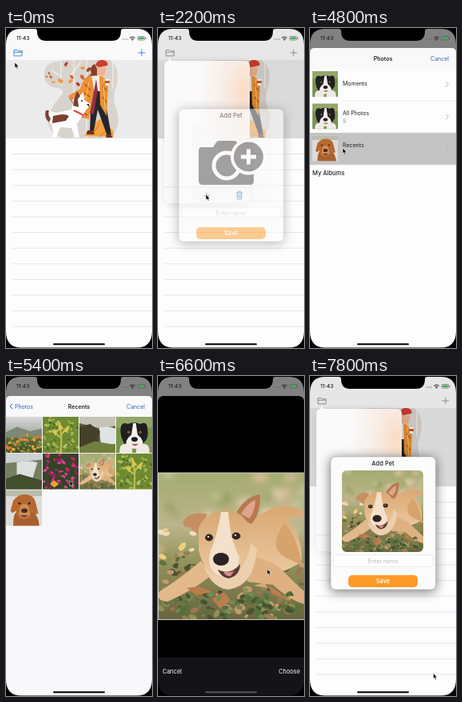
These frames come from a looping animation (183 by 400 pixels, 8 s). An HTML page:

```html
<!DOCTYPE html>
<html lang="en">
<head>
<meta charset="utf-8">
<title>Add a pet</title>
<style>
html, body { margin: 0; width: 100%; height: 100%; overflow: hidden; background: #000; }
svg { display: block; }
#stage { width: 100vw; height: 100vh; }
text { font: 7px Inter, sans-serif; fill: #222; }
.mid { text-anchor: middle; }
.bold { font-weight: 600; }
.link { fill: #2c62b8; }
.soft { fill: #999; }
.line { fill: none; stroke-linecap: round; stroke-linejoin: round; }
</style>
</head>
<body>
<svg id="stage" viewBox="0 0 183 400">
<defs>
  <linearGradient id="meadow" x2="0" y2="1">
    <stop offset="0" stop-color="#a3ab70"/><stop offset=".35" stop-color="#bdb58c"/>
    <stop offset=".6" stop-color="#94935c"/><stop offset="1" stop-color="#66643e"/>
  </linearGradient>
  <linearGradient id="fur" x2="0" y2="1">
    <stop offset="0" stop-color="#d9a873"/><stop offset="1" stop-color="#ecc9a0"/>
  </linearGradient>
  <linearGradient id="mist" x2="0" y2="1">
    <stop offset="0" stop-color="#d8d9da"/><stop offset=".45" stop-color="#a9b0a4"/>
    <stop offset=".6" stop-color="#596b39"/><stop offset="1" stop-color="#3d4f25"/>
  </linearGradient>
  <radialGradient id="glow" cx=".93" cy=".22" r=".55">
    <stop offset="0" stop-color="#fbdcc3"/><stop offset=".35" stop-color="#f8ebe2"/><stop offset="1" stop-color="#fbfafb"/>
  </radialGradient>
  <pattern id="checks" width="4" height="4" patternUnits="userSpaceOnUse">
    <path d="M0 0h2v2H0zM2 2h2v2H2z" fill="#f5f5f5"/>
  </pattern>
  <filter id="blur"><feGaussianBlur stdDeviation="4"/></filter>
  <filter id="haze" x="-30%" y="-30%" width="160%" height="160%"><feGaussianBlur stdDeviation="7"/></filter>
  <clipPath id="sheetClip"><path d="M0 400V31q0-6 6-6H177q6 0 6 6V400z"/></clipPath>
  <clipPath id="petClip"><rect x="40" y="118" width="102" height="102" rx="6"/></clipPath>
  <clipPath id="heroClip"><rect y="40" width="183" height="98"/></clipPath>

  <symbol id="puppy" viewBox="0 0 183 184">
    <rect width="183" height="184" fill="url(#meadow)"/>
    <g id="bokeh" filter="url(#blur)"></g>
    <g id="litter"></g>
    <path d="M104 75Q122 52 147 43Q170 38 183 50V56Q170 52 163 60Q182 80 180 112L160 122L122 130Z" fill="url(#fur)"/>
    <path d="M150 78Q142 96 160 106L181 116Q175 82 158 62Z" fill="#d6a36c"/>
    <path d="M54 110Q28 132 1 149Q-3 160 12 161Q42 148 66 129Z" fill="#e3b98c"/>
    <path d="M106 102Q143 108 156 122Q176 142 183 148V164Q165 159 144 140L112 136Z" fill="#dfb181"/>
    <path d="M56 108Q62 142 88 146Q120 142 124 96L108 78Z" fill="#ecd0ae"/>
    <path d="M62 52Q42 46 31 61Q32 69 40 68L49 76Z" fill="#c78e62"/>
    <path d="M97 52Q108 30 128 27Q129 51 117 64Z" fill="#b9784f"/>
    <path d="M104 51Q114 36 122 34Q122 49 114 57Z" fill="#dca58c"/>
    <path d="M51 68Q62 47 85 47Q111 48 115 74Q119 99 104 119Q92 132 76 130Q57 124 51 97Z" fill="url(#fur)"/>
    <path d="M79 49Q74 79 65 100Q60 123 80 130Q101 130 102 105Q91 86 88 49Z" fill="#f3e1cb"/>
    <path d="M75 121Q91 129 103 114Q103 128 89 132Q79 131 75 121Z" fill="#593b36"/>
    <path d="M82 123q9 3 14-1l-5 7q-7 1-9-6z" fill="#d98b86"/>
    <ellipse cx="79" cy="108" rx="10" ry="8" fill="#292326"/>
    <ellipse cx="64" cy="81" rx="5" ry="4.4" fill="#33271f"/><ellipse cx="98" cy="79" rx="5.5" ry="4.4" fill="#33271f"/>
    <path d="M62 80h2M96 78h2" stroke="#dce6ea" stroke-width="2"/>
    <path d="M68 158l14-9 10 10-14 11zM36 144l15-2 17 7-20 4zM138 140l31 21-26-9z" fill="#bb7d4b"/>
    <path d="M120 141l14-4 3 7z" fill="#dba67a"/>
    <g id="clover"></g>
  </symbol>

  <symbol id="collie" viewBox="0 0 40 40">
    <rect width="40" height="40" fill="#78954a"/><path d="M0 0h40v12H0z" fill="#92a768"/>
    <path d="M5 13Q6 5 13 8Q20 5 27 8Q35 4 35 14Q37 25 30 29L9 30Q4 20 5 13z" fill="#201f20"/>
    <path d="M19 7h3l2 13q8 6 5 13-8 5-17 0-3-7 5-13z" fill="#f3efec"/>
    <path d="M4 40q-1-10 7-10t7 10zM22 40q0-10 8-10t7 10z" fill="#eee9e4"/>
    <ellipse cx="20.500" cy="25" rx="3.500" ry="2.500" fill="#1d1b1c"/><path d="M17 30q4 5 8 0z" fill="#ba686b"/>
    <circle cx="14" cy="17" r="1.500" fill="#8a5d32"/><circle cx="27" cy="17" r="1.500" fill="#8a5d32"/>
  </symbol>
  <symbol id="golden" viewBox="0 0 40 40">
    <rect width="40" height="40" fill="#dedcd8"/><path d="M0 0h40v7H0z" fill="#b9bdad"/>
    <path d="M8 40Q8 28 11 25L30 24Q37 30 37 40z" fill="#a9602e"/>
    <path d="M8 12Q13 5 21 5Q31 5 33 14L36 26Q31 29 29 23Q27 33 20 33Q13 33 11 23Q7 28 5 23z" fill="#b5682f"/>
    <path d="M16 18Q20 13 25 18L27 28Q20 35 14 28z" fill="#cf8d54"/>
    <ellipse cx="20.500" cy="23" rx="3.500" ry="2.500" fill="#4a2b23"/><path d="M16 28q4 5 9 0z" fill="#704035"/>
    <circle cx="15" cy="15" r="1.400" fill="#37221a"/><circle cx="26" cy="15" r="1.400" fill="#37221a"/>
  </symbol>
  <symbol id="hills" viewBox="0 0 40 40">
    <rect width="40" height="40" fill="url(#mist)"/><path d="M0 17l12-6 15 5 13-3v10H0z" fill="#7d8975"/>
    <g class="dots" data-colors="#e4a83c #d97b38 #769043" data-top="20"></g>
  </symbol>
  <symbol id="plants" viewBox="0 0 40 40">
    <rect width="40" height="40" fill="#6f8a31"/>
    <g class="dots" data-colors="#9db44b #4f702a #b9c466" data-top="0"></g>
    <path d="M20 40Q22 18 18 7M20 23L11 16M21 19L29 11" class="line" stroke="#b9bd52" stroke-width="2"/>
    <path d="M18 5l5 8-6 3zM29 9l-1 9-5-2zM10 14l7 2-3 5z" fill="#dec64c"/>
  </symbol>
  <symbol id="falls" viewBox="0 0 40 40">
    <rect width="40" height="40" fill="#59603f"/><path d="M0 0h40v10L24 13 0 7z" fill="#c8c3b9"/>
    <path d="M22 12q11-2 18 1v17l-16 3z" fill="#dfe3e4"/><path d="M0 11l12-3 11 8-4 17-19 7z" fill="#453f2b"/>
    <path d="M0 34l17-7 23 4v9H0z" fill="#71803e"/>
  </symbol>
  <symbol id="gorge" viewBox="0 0 40 40">
    <rect width="40" height="40" fill="#76805f"/><path d="M0 0h40v7L0 11z" fill="#ccd1d2"/>
    <path d="M12 10q11-3 23 0l-5 17-18 4z" fill="#dce0df"/><path d="M0 28l15-5 25 7v10H0z" fill="#424e2c"/>
  </symbol>
  <symbol id="blooms" viewBox="0 0 40 40">
    <rect width="40" height="40" fill="#354327"/>
    <g class="dots" data-colors="#c52472 #d84590 #9c1b5c" data-top="0"></g>
    <path d="M8 34l5-4 5 4-5 4z" fill="#eda32f"/>
  </symbol>
</defs>

<g id="home">
  <rect width="183" height="400" fill="#fdfdfd"/>
  <rect width="183" height="40" fill="#f9f9f9"/>
  <path id="rules" class="line" stroke="#dde1e3" stroke-width=".8"/>
  <rect y="40" width="183" height="98" fill="#ebebeb"/>
  <g clip-path="url(#heroClip)">
    <path d="M48 61Q47 43 65 42Q77 37 91 40H130Q144 49 138 74Q132 87 139 104Q145 122 131 138H73Q50 132 53 109Q60 94 71 82Q73 75 60 74Q49 71 48 61z" fill="#d9d3ce"/>
    <path d="M69 41V72M85 40V138M101 40V138M134 44V75M57 53l13 8M79 62l15-20M87 91l13-20" class="line" stroke="#eeeae6" stroke-width="1.500"/>
    <g id="leaves"></g>
    <path d="M99 135q1-9 10-7 2-13 10-14 8 0 8 10 9 1 8 12z" fill="#f3a33f"/><path d="M108 134l9-14M117 136l10-9" stroke="#d97a23"/>
    <path d="M111 45Q104 48 107 57L97 65Q110 68 118 58z" fill="#873c25"/>
    <path d="M114 49h11q1 11-6 12l-5-2z" fill="#efb592"/>
    <path d="M112 47q2-8 10-7 7 2 5 7l-10 2z" fill="#cf3e2e"/>
    <path d="M106 60l14-1 2 25-15 2z" fill="#f4ece4"/>
    <path d="M107 79l16 0 2 16 7 39-5 1-12-33-5 27-5 2z" fill="#25252b"/>
    <path d="M125 134l5-2 4 5h-8zM102 128h7l2 5h-10z" fill="#6e302a"/>
    <path d="M107 59Q97 61 93 76L78 85l3 5 19-5-16 24 20 5 7-33zM117 59q8 2 11 14l-2 37-8-14z" fill="#ed9135"/>
    <path d="M99 70l7 8M95 91l10 7M91 102l11 7M121 72l5 6M121 86l5 7M98 81l7 5" stroke="#c04f30" stroke-width="1.600"/>
    <path d="M104 67l-5 28M122 64l2 38" stroke="#f8c85c"/>
    <path d="M113 64l-8 43 5 1 5-30z" fill="#8f3149"/>
    <path d="M119 70l6-3 5 2-4 6z" fill="#ed9135"/><path d="M124 64h6l-1 8h-4z" fill="#fff5ea"/><path d="M124 66h6v3h-6z" fill="#c95a39"/>
    <path d="M80 88L96 112" stroke="#a44834" class="line"/>
    <path d="M53 103q-8 8 4 17 4 13 1 17h5l5-13 14 1 5 12h5l-3-17 12-18 5-7-8-5-1-10-5 5-6-1-4 18-19 4z" fill="#fff"/>
    <path d="M59 110q15-4 20 0l-4 6-17 3zM86 86l3-7 4 6-3 4 1 10-7-2zM50 103q-3 9 4 15l2-5q-4-4-2-10z" fill="#7b4032"/>
    <path d="M85 103l12 6" stroke="#dc4a38" stroke-width="2"/><circle cx="95" cy="91" r=".9"/><path d="M101 95h3v3z"/>
  </g>
  <rect id="shade" y="0" width="183" height="138" fill="#000"/>
  <g id="barIcons" class="line" stroke-width=".9">
    <path d="M10 34.500V27.500h4l1.200 1.200h4.800v5.800zM10 30.200h10"/><path d="M166 31h8M170 27v8"/>
  </g>
</g>

<g id="popover">
  <rect x="10" y="44" width="103" height="177" rx="8" opacity=".13" filter="url(#haze)"/>
  <path d="M8 47q0-6 5-6l2-4 2 4h92q6 0 6 6v166q0 6-6 6H14q-6 0-6-6z" fill="url(#glow)"/>
  <path d="M8 199H115" stroke="#dcdcdc" stroke-width=".7"/>
  <path d="M57.500 209.500h7M61 206v7" class="line" stroke="#444" stroke-width=".9"/>
  <path d="M98 206h8M100.500 206v-1.800h3V206M99 206.500l.6 7.500h4.800l.6-7.500M101 208v4M103 208v4" class="line" stroke="#2d6db5" stroke-width=".9"/>
</g>

<g id="dialog">
  <rect x="25" y="102" width="133" height="168" rx="7" opacity=".5" filter="url(#haze)"/>
  <rect x="26" y="101" width="131.500" height="166" rx="6" fill="#fcfcfc" stroke="#999" stroke-width=".4"/>
  <text x="91.500" y="112" class="mid" style="font-size:7.500px;font-weight:500">Add Pet</text>
  <g id="camera">
    <rect x="42" y="118" width="100" height="102" fill="url(#checks)"/>
    <path d="M55 149H69l4-6q1-2 4-2H95q3 0 4 2l4 6h12q5 0 5 5v37q0 5-5 5H56q-5 0-5-5V154q0-5 4-5z" fill="#4b494a"/>
    <circle cx="86" cy="172" r="16" fill="#4b494a" stroke="#fcfcfc" stroke-width="5"/>
    <circle cx="113.500" cy="161" r="20.500" fill="#4b494a" stroke="#fcfcfc" stroke-width="4"/>
    <path d="M104 161h19M113.500 151.500v19" stroke="#fff" stroke-width="5"/>
  </g>
  <g id="pet" clip-path="url(#petClip)"><use href="#puppy" x="40" y="118" width="102" height="102.500"/></g>
  <rect x="29.500" y="223.500" width="124.500" height="15" rx="3" fill="#fff" stroke="#e3e3e3" stroke-width=".7"/>
  <text x="91.500" y="233.500" class="mid" style="fill:#b9b9bd">Enter name</text>
  <rect x="48" y="249" width="87" height="15" rx="5" fill="#fd9a29"/>
  <text x="91.500" y="259.200" class="mid" style="fill:#fff;font-size:7.500px;font-weight:500">Save</text>
</g>

<rect id="dim" width="183" height="400"/>
<g id="sheet" clip-path="url(#sheetClip)">
  <rect y="25" width="183" height="375" fill="#fdfdfd"/>
  <g id="albums">
    <rect id="pressed" y="131" width="183" height="40" fill="#c5c4c5"/>
    <path d="M41 91H183M41 131H183M0 171H183" stroke="#dedede" stroke-width=".7"/>
    <use href="#collie" x="3" y="54" width="32" height="32"/>
    <use href="#collie" x="3" y="94.500" width="32" height="32"/>
    <use href="#golden" x="3" y="134.500" width="32" height="32"/>
    <text x="41" y="72">Moments</text><text x="41" y="109.200">All Photos</text><text x="41" y="118.500" class="soft">9</text>
    <text x="41" y="149">Recents</text><text x="41" y="158.500" class="soft">9</text>
    <path d="M170.500 67.500l3 3-3 3M170.500 108l3 3-3 3M170.500 148l3 3-3 3" class="line" stroke="#aaa" stroke-width=".9"/>
    <text x="3" y="184" style="font-size:7.500px;font-weight:500">My Albums</text>
  </g>
  <g id="grid"><rect y="25" width="183" height="375" fill="#f8f7f9"/></g>
  <rect y="25" width="183" height="25.500" fill="#f9f9fa"/>
  <g id="nav">
    <text id="albumsTitle" x="91.500" y="40.500" class="mid bold">Photos</text>
    <g id="gridTitle">
      <path d="M8 35l-3 3 3 3" class="line" stroke="#2c62b8"/><text x="11" y="40.500" class="link">Photos</text>
      <text x="91.500" y="40.500" class="mid bold">Recents</text>
    </g>
    <text x="162.500" y="40.500" class="mid link">Cancel</text>
  </g>
  <g id="crop">
    <rect y="25" width="183" height="375"/>
    <use href="#puppy" y="121" width="183" height="184"/>
    <path d="M0 121H183M0 304.500H183M.4 121V305" stroke="#e8e8dc" stroke-width=".8"/>
    <rect y="352" width="183" height="48" fill="#141418"/>
    <text x="5.500" y="371.500" style="fill:#fff;font-size:7.400px">Cancel</text>
    <text x="178" y="371.500" text-anchor="end" style="fill:#fff;font-size:7.400px">Choose</text>
  </g>
</g>

<g id="device">
  <path fill-rule="evenodd" d="M0 0H183V400H0zM0 21Q0 1 19 1H36Q39 1 39 4Q39 16 50 16H133Q144 16 144 4Q144 1 147 1H164Q183 1 183 21V379Q183 399.500 164 399.500H19Q0 399.500 0 379z"/>
  <text x="13" y="15.300" style="font-size:6.800px;font-weight:500">11:43</text>
  <path d="M145.500 14h7.500" stroke="#555" stroke-dasharray="1 1.200"/>
  <path d="M155.500 12q3-2.500 6 0M157 13.600q1.500-1.200 3 0" class="line" stroke="#222"/><circle cx="158.500" cy="15" r=".7"/>
  <rect x="165" y="10.500" width="9" height="4.600" rx="1.200" fill="none" stroke="#555" stroke-width=".6"/>
  <rect x="166" y="11.500" width="7" height="2.600" rx=".5" fill="#35b54a"/><path d="M175 12v1.800" stroke="#555"/>
  <rect id="indicator" x="59" y="394.200" width="65" height="2" rx="1"/>
</g>
<path id="cursor" d="M0 0V7l1.600-1.400L2.800 8.200 4 7.600 2.900 5.200H5z" stroke="#fff" stroke-width=".6"/>
</svg>

<script>
const LOOP = 8000, STEP = 200, WIDTH = 183;
const $ = id => document.getElementById(id);

let seed = 7;
const random = (min, max) => {
  seed = (seed * 16807) % 2147483647;
  return min + (max - min) * seed / 2147483647;
};
const draw = (parent, name, attributes) => {
  const node = document.createElementNS('http://www.w3.org/2000/svg', name);
  for (const key in attributes) node.setAttribute(key, attributes[key]);
  parent.append(node);
};
const scatter = (parent, count, colors, [x0, x1, y0, y1], [r0, r1]) => {
  for (let i = 0; i < count; i++) {
    const cx = random(x0, x1), cy = random(y0, y1), r = random(r0, r1);
    draw(parent, 'ellipse', {
      cx, cy, rx: r, ry: r * .6, fill: colors[i % colors.length],
      transform: `rotate(${random(-60, 60)} ${cx} ${cy})`
    });
  }
};

scatter($('bokeh'), 30, ['#d9bd9e', '#899a54', '#c3c496', '#e3d0b2'], [0, 183, 0, 105], [5, 13]);
scatter($('litter'), 170, ['#5e7139', '#9a7950', '#4b512e', '#8f9150', '#c29b72'], [0, 183, 98, 184], [2, 6]);
scatter($('litter'), 8, ['#efd07b', '#f0ddbd'], [0, 45, 70, 108], [3, 6]);
scatter($('clover'), 55, ['#53713f', '#718b52', '#3f5731'], [25, 175, 151, 180], [2, 5]);
scatter($('leaves'), 15, ['#d8642e', '#ed9940', '#a63d2b'], [51, 104, 44, 76], [1.5, 3.5]);
for (const group of document.querySelectorAll('.dots'))
  scatter(group, 65, group.dataset.colors.split(' '), [0, 40, +group.dataset.top, 40], [1, 2.6]);

$('rules').setAttribute('d', Array.from({ length: 12 }, (_, i) => `M8 ${157.6 + i * 19.6}H183`).join(''));
['hills', 'plants', 'falls', 'collie', 'gorge', 'blooms', 'puppy', 'plants', 'golden'].forEach((photo, i) =>
  draw($('grid'), 'use', {
    href: '#' + photo, x: i % 4 * 46, y: 51 + (i >> 2) * 45.7, width: 45, height: 45
  }));

const cursorPath = [
  [0, 11, 43], [400, 14, 32], [800, 14, 32], [1400, 27, 64], [1800, 60, 208], [2400, 60, 208],
  [3200, 98, 167], [4000, 98, 167], [4600, 41, 150], [5000, 41, 150], [5800, 119, 111],
  [6200, 119, 111], [7000, 154.5, 371.5], [8000, 154.5, 371.5]
];
const clamp = x => Math.min(1, Math.max(0, x));
const ramp = (t, start, end) => clamp((t - start) / (end - start));
const smooth = x => x * x * (3 - 2 * x);
const easeOut = x => 1 - (1 - x) ** 3;

const move = (id, x, y = 0) => $(id).setAttribute('transform', `translate(${x} ${y})`);
const fade = (id, opacity) => $(id).setAttribute('opacity', opacity);

function render(t) {
  const popover = ramp(t, 400, 800);
  const dialog = ramp(t, 2000, 2400);
  const sheet = easeOut(ramp(t, 3600, 4200)) - smooth(ramp(t, 7200, 7800));
  const push = easeOut(ramp(t, 4800, 5400));
  const crop = t < 6200 ? 0 : t < 6400 ? .23 : .23 + .77 * easeOut(ramp(t, 6200, 6600));

  fade('popover', popover);
  fade('shade', .06 * popover + .02 * dialog);
  $('barIcons').setAttribute('stroke', popover > .4 ? '#858585' : '#2e80d8');
  fade('dialog', dialog);
  fade('camera', t < 7000 ? 1 : 0);
  fade('pet', t < 7000 ? 0 : 1);

  fade('dim', .44 * sheet);
  move('sheet', 0, 376 * (1 - sheet));
  fade('pressed', t >= 4800 ? 1 : 0);
  move('albums', -.3 * WIDTH * push);
  move('grid', WIDTH * (1 - push) - .3 * WIDTH * crop);
  move('nav', -WIDTH * crop);
  fade('albumsTitle', 1 - push);
  move('gridTitle', WIDTH * (1 - push));
  move('crop', WIDTH * (1 - crop));
  $('indicator').setAttribute('fill', crop > .9 && sheet > .9 ? '#55555a' : '#000');

  const next = cursorPath.findIndex(point => point[0] > t);
  const [t0, x0, y0] = cursorPath[next - 1], [t1, x1, y1] = cursorPath[next];
  const k = smooth(ramp(t, t0, t1));
  move('cursor', x0 + (x1 - x0) * k, y0 + (y1 - y0) * k);
}

const begin = performance.now();
function tick() {
  const t = (performance.now() - begin) % LOOP;
  render(Math.floor(t / STEP) * STEP);
  requestAnimationFrame(tick);
}
tick();
</script>
</body>
</html>
```
